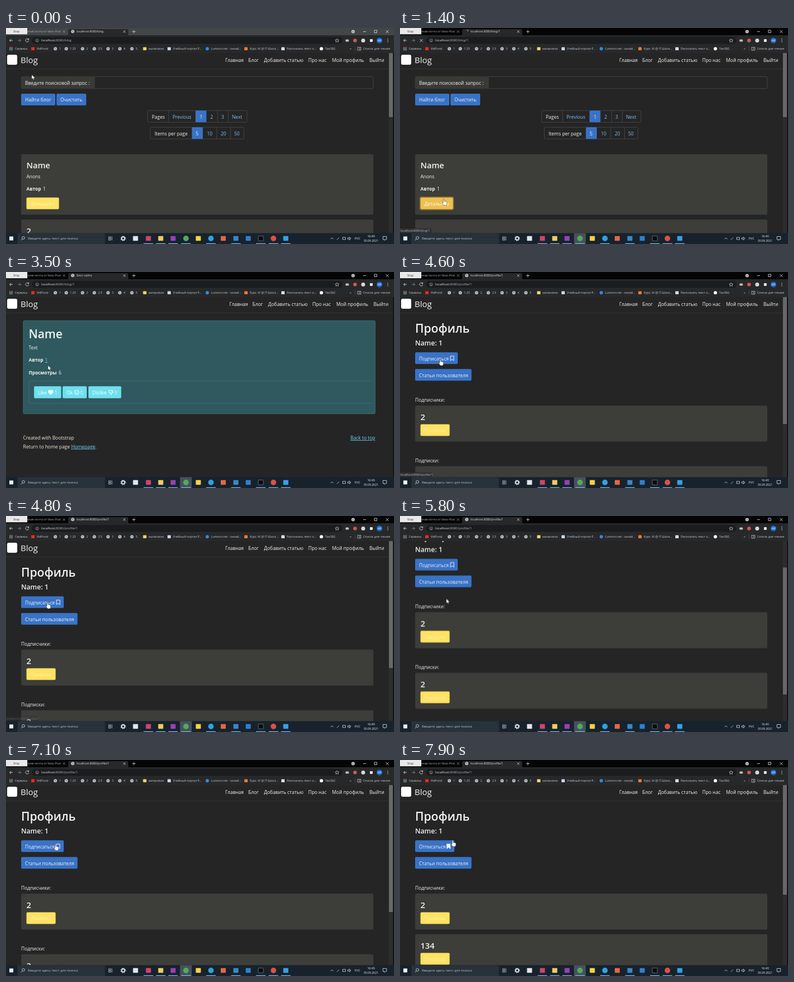
An HTML page for the animation above (8000 ms loop, 692x388 px).

```html
<!DOCTYPE html>
<html lang="ru">
<head>
<meta charset="utf-8">
<title>Blog</title>
<style>
  html, body { margin: 0; width: 100%; height: 100%; overflow: hidden; background: #252525; }
  svg { display: block; width: 692px; height: 388px; }
  text { font-family: "Open Sans", "Noto Sans", sans-serif; white-space: pre; }
  .link { fill: #6fd6f2; text-decoration: underline; }
</style>
</head>
<body>
<svg id="stage" viewBox="0 0 692 388"></svg>
<script>
const LOOP = 8000;
const WHITE = '#f2f2f2', BLUE = '#3973c6', SKY = '#83bdf3', YELLOW = '#ffe263', LINE = '#4a4c4a';

// Drawing helpers
const text = (x, y, s, size = 8.45, fill = WHITE, extra = '') =>
  `<text x="${x}" y="${y}" font-size="${size}" fill="${fill}" ${extra}>${s}</text>`;
const bold = (x, y, s, size, weight = 600) => text(x, y, s, size, WHITE, `font-weight="${weight}"`);
const box = (x, y, w, h, fill, r = 0, extra = '') =>
  `<rect x="${x}" y="${y}" width="${w}" height="${h}" rx="${r}" fill="${fill}" ${extra}/>`;
const dot = (x, y, r, fill, extra = '') => `<circle cx="${x}" cy="${y}" r="${r}" fill="${fill}" ${extra}/>`;
const line = (d, color = '#ddd', w = 0.8, fill = 'none') =>
  `<path d="${d}" fill="${fill}" stroke="${color}" stroke-width="${w}"/>`;
const group = (id, ...parts) => `<g id="${id}">${parts.join('')}</g>`;
const at = (x, y, s) => `<g transform="translate(${x} ${y})">${s}</g>`;
const button = (x, y, w, label, fill = BLUE, color = WHITE, h = 21) =>
  box(x, y, w, h, fill, 2) + text(x + 7, y + 14.2, label, 8.45, color);
const card = (y, h) => box(27.3, y, 627.5, h, '#3d3d39', 2, 'stroke="#38434c" stroke-width=".6"');

// Page parts
const nav = dx => box(2, 48, 18, 18, '#fff', 3) + text(26, 63, 'Blog', 15) +
  [[391, 'Главная'], [432, 'Блог'], [460, 'Добавить статью'], [539, 'Про нас'],
   [581.5, 'Мой профиль'], [648, 'Выйти']].map(([x, s]) => text(x + dx, 60.8, s)).join('') +
  box(0, 73, 683 + dx, 0.7, '#3c3c3c');
const footer = (x, y, right) => text(x, y, 'Created with Bootstrap', 8.45, '#f4ead9') +
  text(right, y, 'Back to top', 8.45, '', 'class="link" text-anchor="end"') +
  text(x, y + 15.7, 'Return to home page <tspan class="link">Homepage</tspan>.', 8.45, '#f4ead9');
const scrollbar = (id, h) => box(682.5, 45, 8, 323, '#2d2d2d') + group(id, box(683, 45, 7, h, '#686868'));
const pager = (x, y, w, cells, cuts, on) =>
  box(x, y, w, 21, 'none', 2, `stroke="${LINE}" stroke-width=".8"`) +
  cuts.map(c => box(c, y, 0.8, 21, LINE)).join('') + box(on, y, 19.5, 21, BLUE, 1.5) +
  cells.map(([cx, s, c = SKY]) => text(cx, y + 14.2, s, 8.45, c)).join('');

const mark = fill => line('M.5 .5H6.5V8.7L3.5 6.3.5 8.7Z', '#fff', 0.9, fill);
const heart = fill => line('M4.5 8.3C-2 3.8.5.4 2.6.5 3.8.6 4.5 1.7 4.5 1.7S5.2.6 6.4.5C8.5.4 11 3.8 4.5 8.3Z', '#fff', 0.9, fill);
const smile = dot(4.5, 4.5, 4, 'none', 'stroke="#fff" stroke-width=".9"') +
  dot(3, 3.6, 0.6, '#fff') + dot(6, 3.6, 0.6, '#fff') + line('M2.5 5.6Q4.5 7.8 6.5 5.6', '#fff');
const thumb = line('M.6 1H5.5L7.5 1.8V5L5.3 6V8.4H3.8L3.4 5.5H.8Z', '#fff', 0.9) + box(5.6, 1, 2, 4, '#fff');

const blogPage = group('blog', nav(0),
  box(27.3, 87.3, 627.5, 21.5, 'none', 2, `stroke="${LINE}" stroke-width=".8"`),
  box(27.5, 87.5, 131, 21, '#393936', 2), text(34, 101.8, 'Введите поисковой запрос :'),
  button(27, 118, 61, 'Найти блог'), button(90, 118, 53, 'Очистить'),
  pager(252.7, 148.3, 177, [[260, 'Pages', WHITE], [297, 'Previous'], [345.5, '1', WHITE],
    [364.5, '2'], [384, '3'], [403, 'Next']], [289.5, 377, 396], 338),
  pager(257.3, 178.3, 167, [[265, 'Items per page', WHITE], [338.5, '5', WHITE],
    [358.5, '10'], [383, '20'], [407, '50']], [375.5, 400], 331.5),
  card(227, 108), bold(36.5, 252, 'Name', 14.6), text(36.5, 270, 'Anons'),
  bold(36.5, 292.3, 'Автор', 8.3, 700), text(66, 292.3, '1'),
  button(36.5, 304.5, 58, 'Детальнее', YELLOW, '#fff3bd'),
  group('ring', box(34.8, 302.8, 61.4, 24.4, '#80672d', 3)),
  group('hover', button(36.5, 304.5, 58, 'Детальнее', '#ecc052', '#fffbe8')),
  card(344.5, 60), bold(36.5, 370, '2', 14.6), scrollbar('thumbA', 115));

const detailPage = group('detail', nav(7.5),
  box(30.8, 87.3, 627.6, 167.4, '#2f595e', 2, 'stroke="#417a80" stroke-width=".7"'),
  bold(40.5, 119, 'Name', 20.8), text(40.5, 138.5, 'Text'),
  bold(40.5, 161, 'Автор', 8.3, 700), text(69.5, 161, '1', 8.45, '', 'class="link"'),
  bold(40.5, 183.6, 'Просмотры', 8.3, 700),
  group('five', text(94, 183.6, '5')), group('six', text(94, 183.6, '6')),
  line('M652 196H44q-3 0-3 3V233q0 3 3 3H652', '#48757a', 0.6),
  [[50, 48.5, 'Like'], [101, 43, 'Ok'], [147, 58.5, 'Dislike']]
    .map(([x, w, s]) => button(x, 205.3, w, s, '#6edfee', '#fff', 21.5)).join(''),
  group('unliked', at(75.3, 211.8, heart('none')), text(86.5, 219.5, '0')),
  group('liked', at(75.3, 211.8, heart('#fff')), text(86.5, 219.5, '1')),
  at(121.5, 211.6, smile), text(132.5, 219.5, '0'),
  at(183, 211.6, thumb), text(193.5, 219.5, '0'), footer(30.5, 301, 658.5));

const follower = (y, name) => card(y, 64) + bold(36.5, y + 25.7, name, 14.6) +
  button(36.5, y + 33.3, 52, 'Профиль', YELLOW, '#fff0a8');
const profilePage = group('profile',
  group('scroll', nav(0), bold(27, 109.3, 'Профиль', 21), bold(27, 132.3, 'Name: 1', 12.2),
    button(27, 174.3, 100.5, 'Статьи пользователя'),
    text(27, 232.8, 'Подписчики:'), follower(240.3, '2'),
    group('before', button(27, 144.3, 76, 'Подписаться'), at(89.5, 150.5, mark('none')),
      text(27, 341.8, 'Подписки:'), follower(349.2, '2'), footer(27, 459, 655)),
    group('after', button(27, 144.3, 70, 'Отписаться'), at(83, 150.5, mark('#fff')),
      follower(313.2, '134'))),
  group('barB', scrollbar('thumbB', 228)), group('barC', scrollbar('thumbC', 197)));

const status = (id, s) => group(id, box(0, 360, 57, 8.5, '#303134', 1) + text(1, 366.3, s, 5.2, '#b8bcc2'));

// Browser frame
const SMALL = 5.25, GREY = '#c9ccd0';
const globe = (x, y) => dot(x, y, 3, '#c4c8cc') + line(`M${x - 2} ${y - 1}h2l1 1.5-1.5 1.5`, '#4b4e52', 0.8);
const bookmarks = [
  [48, '#f0281f', 'VidPond', 1], [88, '', '1'], [107.5, '', '1.25'], [136.5, '', '2'], [157.5, '', '2.5'],
  [182, '', '3'], [203, '', '4'], [224.5, '', '5'], [247.5, '#f5d571', 'матанализ', 1],
  [291, '#c9d8ea', 'Учебный портал Р...', 1], [359, '#2f8ae8', 'Lumorvi.net - онлай...'],
  [428, '#e87a33', 'Курс: AI @ IT Школ...', 1], [494, '#d9dde2', 'Распознать текст о...', 1], [562.5, '#fff', 'Tavi582']
].map(([x, c, s, square]) => (!c ? globe(x, 37.2) : square ? box(x - 3, 34.4, 6, 5.6, c, 0.8) : dot(x, 37.2, 3, c)) +
  text(x + 6.7, 39.2, s, SMALL, GREY)).join('');
const title = (id, s) => group(id, text(126, 8.4, s, SMALL, '#e2e4e7'));
const address = (id, path) => group(id,
  text(63, 24.4, `localhost:<tspan fill="#aeb2b7">8080/${path}</tspan>`, 5.9, '#e8eaed'));

const browser = group('browser',
  box(0, 0, 692, 13.5, '#050505'), group('unfocused', box(0, 0, 692, 13.5, '#434648')),
  box(0, 13, 692, 32, '#27282a'),
  text(37, 8.4, 'нная почта от Vexo-Post', SMALL, '#a7abb0'),
  line('M101.5 4.5l4 4m0-4l-4 4', '#b0b3b7', 0.7),
  `<path d="M109 13.5q2 0 2-2V4q0-2 2-2H216q2 0 2 2V11.5q0 2 2 2Z" fill="#27282a"/>`,
  line('M209 4.5l4 4m0-4l-4 4M225 6.5h6m-3-3v6', '#d5d7da', 0.8),
  box(0, 0, 38, 11.3, '#e9e9e9'), text(13, 7.8, 'Stop', 5.2, '#333'),
  title('titleBlog', 'localhost:8080/blog'), title('titleWait', 'localhost:8080/blog/1'),
  title('titleSite', 'Блог сайта'), title('titleProfile', 'localhost:8080/profile/1'),
  group('favicon', globe(119, 6.3)), group('spinner', line('M119 3.5a2.8 2.8 0 0 1 2.8 2.8', '#8ab4f8', 1)),
  dot(619, 6.5, 3, '#c7c9cc') + line('M617.6 6l1.4 1.4 1.4-1.4', '#222'),
  line('M637 6.5h5M657 4h4.5v4.5h-4.5zM677.5 4l5 5m0-5l-5 5', '#e4e4e4', 0.8),
  box(46, 16, 554, 12.6, '#1b1c1e', 6.3),
  line('M12 22.3H6.5m2.5-2.6-2.6 2.6 2.6 2.6', '#d4d6d9', 0.9),
  line('M21 22.3h5.5m-2.5-2.6 2.6 2.6-2.6 2.6', '#85888c', 0.9),
  group('reload', line('M40 20.3a2.9 2.9 0 1 0 .6 2.6M40.5 18.8v2.2h-2.2', '#d4d6d9', 0.9)),
  group('stop', line('M35.5 20l5 5m0-5l-5 5', '#d4d6d9', 0.9)),
  dot(55.5, 22.4, 2.6, 'none', 'stroke="#b8bbbf" stroke-width=".7"'), box(55.1, 22, 0.8, 2, '#b8bbbf'),
  address('urlBlog', 'blog'), address('urlPost', 'blog/1'), address('urlProfile', 'profile/1'),
  line('M590.5 19l1 2.3 2.5.2-1.9 1.6.6 2.4-2.2-1.3-2.2 1.3.6-2.4-1.9-1.6 2.5-.2Z', '#d4d6d9', 0.7),
  box(605.5, 20.5, 6, 4, '#c6beb8', 1.5), dot(622.5, 22.4, 3.2, '#cf5b52'), dot(637, 22.4, 3.5, '#d8d8d8'),
  box(649, 20, 5, 5, '#e8e8e8', 1), dot(666, 22.4, 5, '#1f6fd0'),
  text(666, 24.4, 'dd', 5.5, '#fff', 'text-anchor="middle"'),
  [20, 22.4, 24.8].map(y => dot(681, y, 0.7, '#ddd')).join(''),
  [0, 1, 2].map(i => [0, 1, 2].map(j => box(6 + i * 2.2, 34.3 + j * 2.2, 1.5, 1.5, ['#e66', '#8b8', '#6ae'][j])).join('')).join(''),
  text(16, 39.2, 'Сервисы', SMALL, GREY), bookmarks, text(613, 39.2, '»', 6, GREY),
  box(622.5, 33, 0.6, 8, '#55585c'), line('M627 34.5h6v5.5h-6zM629 36.2h3M629 38.2h3', GREY, 0.7),
  text(637, 39.2, 'Список для чтения', SMALL, GREY));

// Taskbar: x, colour, round, open
const apps = [
  [231, '#dfe6ec'], [254, '#d2436d', 0, 1], [276, '#f3cc5c', 0, 1], [298, '#9b3fb5', 0, 1], [321, '#55a95b', 1, 1],
  [343, '#f6d33c'], [365.5, '#2fa3de', 1, 1], [387.5, '#e8663f'], [410, '#3a87c8', 0, 1], [432, '#2f7fd0'],
  [454.5, '#090b0d', 0, 1], [477, '#dd5146', 1, 1], [499, '#36a1ea', 0, 1]
].map(([x, c, round, open]) => (round ? dot(x, 378, 4.9, c) :
  box(x - 4.5, 373.7, 9, 8.6, c, 0.8, c === '#090b0d' ? 'stroke="#9aa3aa" stroke-width=".6"' : '')) +
  (open ? box(x - 8.5, 386.7, 17, 1.3, '#77b6e4') : '')).join('');
const taskbar = group('taskbar',
  box(0, 368.5, 692, 20, '#17222c'), box(20.5, 368.5, 156, 20, '#28323b'),
  box(6, 374.5, 7, 7, '#eef4f8'), dot(31, 377, 2.4, 'none', 'stroke="#dde" stroke-width=".8"'),
  line('M29.3 378.8l-2.5 2.6', '#dde'), text(39, 380.3, 'Введите здесь текст для поиска', 5.85, '#b8c0c6'),
  line('M183 375h4v2.3h-4zM183 378.8h4v2.3h-4zM189 374.5v7', '#dde3e7', 0.7),
  dot(209, 378, 2.7, 'none', 'stroke="#f4f6f8" stroke-width="1.6"'),
  dot(209, 378, 4, 'none', 'stroke="#f4f6f8" stroke-width="1.3" stroke-dasharray="1.57"'),
  group('active', box(310.3, 368.5, 21, 19.5, '#45525c')), apps,
  line('M579 379.3l2.5-2.5 2.5 2.5M590 380.5l4-4M600.5 376h5v4h-5zM609.5 377h1.3l2-1.6v5.4l-2-1.6h-1.3zM614.2 376.5q1 1.6 0 3.2', '#d8dee2', 0.8),
  text(622, 380.2, 'РУС', 5.3), text(651, 375.8, '16:49', 5.2, WHITE, 'text-anchor="middle"'),
  text(651, 384.2, '30.09.2021', 5.2, WHITE, 'text-anchor="middle"'),
  line('M672.3 374.5h6.4v5.4h-2.4l-1.4 1.5v-1.5h-2.6z', '#e4e8ea', 0.8));

const cursor = group('cursor',
  group('arrow', line('M0 0V8L1.9 6.3 3.1 9 4.4 8.4 3.2 5.8H5.8Z', '#222', 0.4, '#fff')),
  group('hand', at(-2.5, 0, line('M1.6 6V1a.9.9 0 0 1 1.8 0V4l4 .9a1 1 0 0 1 .8 1V8.5l-1 3H3L.2 8a.8.8 0 0 1 1.4-.9Z', '#222', 0.5, '#fff'))));

document.getElementById('stage').innerHTML = box(0, 0, 692, 388, '#252525') + blogPage + detailPage + profilePage +
  box(690.5, 13, 1.5, 356, '#0c0c0c') + status('statusPost', 'localhost:8080/blog/1') +
  status('statusAuthor', 'localhost:8080/profile/1') + browser + taskbar + cursor;

// Motion
const play = (id, frames) =>
  document.getElementById(id).animate(frames, { duration: LOOP, iterations: Infinity });

// Each offset appears once, so a span may touch either end of the loop.
const show = (id, ...spans) => {
  const keys = new Map([[0, 0], [LOOP, 0]]);
  for (const [from, to] of spans) keys.set(from, 1).set(to, 0);
  const ordered = [...keys].sort((a, b) => a[0] - b[0]);
  play(id, ordered.map(([t, opacity]) => ({ offset: t / LOOP, opacity, easing: 'steps(1, end)' })));
};
const move = (id, keys, easing = 'ease-in-out') => play(id, keys.map(([t, x, y]) =>
  ({ offset: t / LOOP, transform: `translate(${x}px, ${y}px)`, easing })));

const FOCUS = 1000, OPEN = 1100, POST = 1700, LIKE = 2750, LIKED = 3000, AUTHOR = 4000, PROFILE = 4600,
  FOLLOW = 7400, DONE = 7600;
const waits = [[OPEN, POST], [LIKE, LIKED], [AUTHOR, PROFILE], [FOLLOW, DONE]];
const idle = [[0, OPEN], [POST, LIKE], [LIKED, AUTHOR], [PROFILE, FOLLOW], [DONE, LOOP]];

show('blog', [0, POST]);
show('detail', [POST, PROFILE]);
show('profile', [PROFILE, LOOP]);
show('hover', [800, POST]);
show('ring', [FOCUS, POST]);
show('unfocused', [0, FOCUS]);
show('active', [FOCUS, LOOP]);
for (const id of ['five', 'unliked']) show(id, [0, LIKED]);
for (const id of ['six', 'liked']) show(id, [LIKED, LOOP]);
for (const id of ['before', 'barB']) show(id, [0, DONE]);
for (const id of ['after', 'barC']) show(id, [DONE, LOOP]);
for (const id of ['favicon', 'reload']) show(id, ...idle);
for (const id of ['spinner', 'stop']) show(id, ...waits);
show('titleBlog', [0, OPEN]);
show('titleWait', [OPEN, POST], [LIKE, LIKED]);
show('titleSite', [POST, LIKE], [LIKED, AUTHOR]);
show('titleProfile', [AUTHOR, LOOP]);
show('urlBlog', [0, OPEN]);
show('urlPost', [OPEN, AUTHOR]);
show('urlProfile', [AUTHOR, LOOP]);
show('statusPost', [850, POST]);
play('statusAuthor', [[0, 0], [3750, 0], [3850, 1], [PROFILE, 1], [4900, 0], [LOOP, 0]]
  .map(([t, opacity]) => ({ offset: t / LOOP, opacity })));

const scroll = [[0, 0], [5600, 0], [6000, 134], [6250, 134], [6400, 83], [6650, 0], [LOOP, 0]];
move('scroll', scroll.map(([t, y]) => [t, 0, -y]), 'linear');
move('thumbB', scroll.map(([t, y]) => [t, 0, y * 228 / 323]), 'linear');

show('hand', [750, POST], [2420, 3100], [3650, 5680], [6580, LOOP]);
show('arrow', [0, 750], [POST, 2420], [3100, 3650], [5680, 6580]);
move('cursor', [[0, 46, 84], [200, 46, 84], [800, 78, 307], [1800, 78, 307], [2200, 81, 252], [2550, 75, 214],
  [3000, 75, 214], [3500, 75, 168], [3750, 71, 157], [4500, 71, 157], [4800, 74, 155], [5400, 82, 150],
  [6400, 84, 146], [7000, 88, 151], [7500, 90, 152], [7900, 94, 144], [LOOP, 94, 144]]);
</script>
</body>
</html>
```
